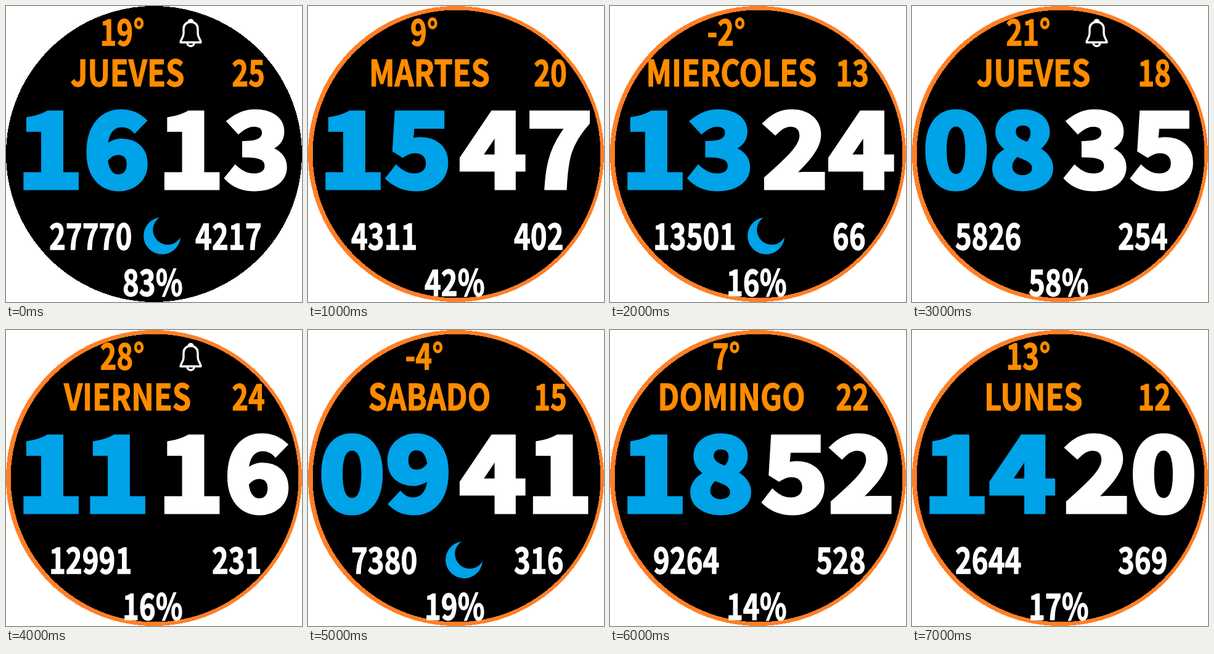
An HTML page that plays this animation: 480x480 px, repeating every 8000 ms.

```html
<!DOCTYPE html>
<html lang="es">
<head>
<meta charset="utf-8">
<title>Watch face</title>
<style>
  html, body { margin: 0; width: 100%; height: 100%; overflow: hidden; background: #fff; }
  svg { display: block; width: 100vw; height: 100vh; }
  circle { shape-rendering: crispEdges; }
  text { font: 700 58px "Noto Sans CJK JP", "Noto Sans CJK SC", "Noto Sans CJK", sans-serif; stroke-width: 1.3px; }
  .big { font-size: 166px; stroke-width: 9px; text-anchor: middle; }
  .mid { text-anchor: middle; }
  .end { text-anchor: end; }
  .orange { fill: #ff8c00; stroke: #ff8c00; }
  .white { fill: #fff; stroke: #fff; }
  .blue { fill: #00a2e8; stroke: #00a2e8; }
  .moon { fill: #00a2e8; }
  .bell { fill: none; stroke: #fff; stroke-width: 3.4px; stroke-linejoin: round; }
  .face { visibility: hidden; animation: show 8s step-end infinite; }
  @keyframes show {
    0% { visibility: visible; }
    12.5%, 100% { visibility: hidden; }
  }
</style>
</head>
<body>
<svg id="stage" viewBox="0 0 480 480"></svg>
<script>
const faces = [
  { temp: "19°", day: "JUEVES", date: "25", time: "1613", steps: "27770", kcal: "4217", power: "83%", bell: true, moon: true, plain: true },
  { temp: "9°", day: "MARTES", date: "20", time: "1547", steps: "4311", kcal: "402", power: "42%" },
  { temp: "-2°", day: "MIERCOLES", date: "13", time: "1324", steps: "13501", kcal: "66", power: "16%", moon: true },
  { temp: "21°", day: "JUEVES", date: "18", time: "0835", steps: "5826", kcal: "254", power: "58%", bell: true },
  { temp: "28°", day: "VIERNES", date: "24", time: "1116", steps: "12991", kcal: "231", power: "16%", bell: true },
  { temp: "-4°", day: "SABADO", date: "15", time: "0941", steps: "7380", kcal: "316", power: "19%", moon: true },
  { temp: "7°", day: "DOMINGO", date: "22", time: "1852", steps: "9264", kcal: "528", power: "14%" },
  { temp: "13°", day: "LUNES", date: "12", time: "1420", steps: "2644", kcal: "369", power: "17%" }
];

const NARROW = 0.785, CAPS = 0.84, WIDE = 1.08;
const digitCenters = [71.5, 179.5, 300, 408];

const label = (str, x, y, cls, sx = NARROW) =>
  `<text class="${cls}" transform="translate(${x} ${y}) scale(${sx} 1)">${str}</text>`;

const ring = `<circle cx="240" cy="240" r="240" fill="#ff7f27"/>
  <circle cx="241" cy="240" r="233.5"/>`;
const disc = `<circle cx="240" cy="240" r="240"/>`;
const moon = `<path class="moon" d="M249 343A30 30 0 1 0 283 375A24 24 0 1 1 249 343Z"/>`;
const bell = `<path class="bell" d="M283 59C283 54 288 52 288 44V37C288 30 293 26 299.5 26
  S311 30 311 37V44C311 52 316 54 316 59Z M296 26a3.5 3.5 0 0 1 7 0 M294 60a5.5 5 0 0 0 11 0"/>`;

const clock = time => [...time].map((d, i) =>
  label(d, digitCenters[i], 293.5, "big " + (i < 2 ? "blue" : "white"), WIDE)).join("");

const draw = (f, i) => `<g class="face" style="animation-delay:${i - faces.length}s">
  ${f.plain ? disc : ring}
  ${label(f.temp, 188.5, 64, "mid orange")}
  ${label(f.day, 197, 130, "mid orange", CAPS)}
  ${label(f.date, 393, 130, "mid orange")}
  ${clock(f.time)}
  ${label(f.steps, 70, 395, "white")}
  ${label(f.kcal, 414.5, 395, "end white")}
  ${label(f.power, 189, 470, "white")}
  ${f.bell ? bell : ""}${f.moon ? moon : ""}
</g>`;

document.getElementById("stage").innerHTML = faces.map(draw).join("");
</script>
</body>
</html>
```
